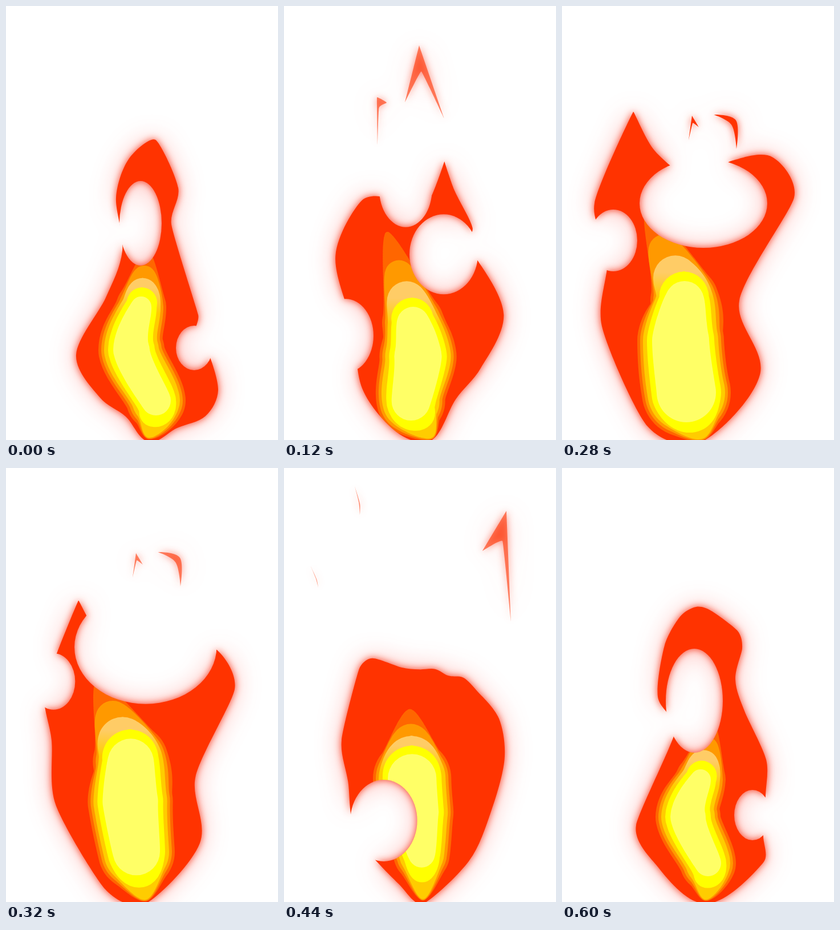
Animation, 477 px wide and 759 px high, one loop 0.64 s. Source, as an HTML page with a canvas:

```html
<!DOCTYPE html>
<html lang="en">
<head>
<meta charset="utf-8">
<title>Flame</title>
<style>
html, body { margin: 0; width: 100%; height: 100%; overflow: hidden; background: #fff; }
canvas { display: block; }
</style>
</head>
<body>
<canvas id="stage" width="477" height="759"></canvas>
<script>
const W = 477, H = 759, STEP = 40, STEPS = 16;
const ctx = document.getElementById('stage').getContext('2d');
const sheet = Object.assign(document.createElement('canvas'), { width: W, height: H });
const ink = sheet.getContext('2d');

// Silhouette key points, clockwise from the lower left to the foot.
// heat: spine of the hot core as x, y, radius from bottom to top; tip: where its glow ends.
const poses = [
  { at: 0, tip: [247,432], heat: [[263,690,26], [220,602,32], [237,526,18]],
    edge: [210,718, 165,685, 123,610, 175,510, 204,428, 193,335, 215,268, 262,234, 302,318,
      290,382, 337,540, 332,575, 355,607, 372,672, 350,717, 300,738, 250,762] },
  { at: 2, tip: [190,415], heat: [[228,693,33], [244,620,43], [222,565,25]],
    edge: [200,747, 154,690, 140,600, 105,460, 150,362, 194,364, 200,402, 262,372, 288,286,
      296,345, 330,420, 330,455, 335,495, 376,605, 345,675, 300,712, 255,762] },
  { at: 5, tip: [165,370], heat: [[212,687,36], [217,600,39], [235,533,35]],
    edge: [190,740, 105,630, 80,480, 61,390, 110,296, 186,293, 200,345, 225,305, 268,243,
      305,278, 332,325, 283,361, 350,347, 404,410, 345,550, 303,640, 265,755] },
  { at: 7, tip: [150,355], heat: [[218,676,52], [208,585,50], [215,515,34]],
    edge: [150,735, 70,560, 80,440, 57,345, 125,185, 160,250, 212,296, 225,280, 240,280,
      250,280, 262,290, 300,270, 370,265, 407,335, 311,515, 347,645, 245,762] },
  { at: 10, tip: [185,415], heat: [[250,661,20], [238,580,46], [226,511,53]],
    edge: [222,740, 122,648, 80,550, 90,470, 131,325, 150,345, 200,380, 220,380, 235,380,
      260,380, 290,370, 330,382, 370,425, 389,490, 375,590, 325,680, 243,762] },
  { at: 13, tip: [292,450], heat: [[224,704,30], [219,645,27], [222,607,22]],
    edge: [165,708, 137,630, 177,545, 123,490, 133,405, 164,308, 220,287, 270,297, 325,295,
      345,330, 364,360, 355,405, 391,465, 382,548, 340,620, 323,702, 245,762] },
  { at: 15, tip: [262,445], heat: [[256,691,23], [221,610,31], [243,545,18]],
    edge: [160,688, 130,625, 199,459, 168,400, 180,310, 207,260, 235,243, 262,250, 308,285,
      316,315, 304,370, 320,425, 358,510, 357,572, 353,642, 353,690, 252,762] }
];

// Swirls of air rising through the flame: step, x, y, radius x, radius y.
const swirls = [
  [[7,90,760,20,20], [10,160,690,54,63], [13,205,470,68,88], [15,232,407,50,91],
    [16,236,380,37,74], [18,225,320,60,86], [21,190,322,19,26]],
  [[10,430,600,30,60], [13,352,635,51,84], [15,334,607,32,44], [16,330,598,32,39],
    [18,292,465,60,66], [21,256,373,60,78], [23,248,345,112,78], [26,238,250,150,142], [29,240,100,150,150]],
  [[2,110,610,50,60], [5,105,510,46,73], [7,90,410,42,54], [10,70,300,30,40]]
];

// Torn-off tongues: step, then tail, crown, tail.
const tongues = [
  [2, 212,212, 237,112, 281,240], [2, 164,285, 163,203, 180,212],
  [7, 222,235, 228,192, 240,212], [7, 266,190, 305,200, 306,250],
  [10, 124,75, 133,105, 133,125], [10, 47,215, 57,237, 60,252], [10, 348,188, 390,118, 398,312]
];
const RISE = 43, FADE = .6;

// Heat bands: colour, padding around the core, reach to the foot, reach to the tip.
const bands = [['#f60', 26, 1, 1], ['#f90', 21, 1, .55], ['#fc0', 16, .95, .25], ['#ff0', 9, .35, .05], ['#ff6', 0, 0, 0]];

const mix = (a, b, t) => a.map((v, i) => v + (b[i] - v) * t);
const pairs = list => list.filter((_, i) => i % 2 === 0).map((x, i) => [x, list[2 * i + 1]]);

// Closed curve whose tangents vanish at sharp tips.
function blob(pts) {
  const n = pts.length, path = new Path2D();
  const tan = pts.map((p, i) => {
    const a = pts[(i + n - 1) % n], b = pts[(i + 1) % n];
    const ux = p[0] - a[0], uy = p[1] - a[1], vx = b[0] - p[0], vy = b[1] - p[1];
    const lu = Math.hypot(ux, uy) || 1, lv = Math.hypot(vx, vy) || 1;
    const bend = .7 + (ux * vx + uy * vy) / (lu * lv);
    const size = Math.min(lu, lv) * Math.max(0, Math.min(1, bend)) / 3;
    const len = Math.hypot(ux + vx, uy + vy) || 1;
    return [(ux + vx) / len * size, (uy + vy) / len * size];
  });
  path.moveTo(...pts[0]);
  pts.forEach(([x, y], i) => {
    const j = (i + 1) % n, [ex, ey] = pts[j];
    path.bezierCurveTo(x + tan[i][0], y + tan[i][1], ex - tan[j][0], ey - tan[j][1], ex, ey);
  });
  return path;
}

function carve(step) {
  ink.globalCompositeOperation = 'destination-out';
  for (const track of swirls) for (const s of [step, step + STEPS]) {
    const i = track.findIndex((k, n) => n + 1 < track.length && k[0] <= s && s <= track[n + 1][0]);
    if (i < 0) continue;
    const a = track[i], b = track[i + 1];
    const [, x, y, rx, ry] = mix(a, b, (s - a[0]) / (b[0] - a[0]));
    ink.beginPath();
    ink.ellipse(x, y, rx, ry, 0, 0, 2 * Math.PI);
    ink.fill();
  }
}

// A tapering tube of discs along the spine.
function tube(nodes) {
  const path = new Path2D(), last = nodes.length - 1, detail = 40;
  for (let i = 0; i <= last * detail; i++) {
    const k = Math.min(last - 1, Math.floor(i / detail)), t = i / detail - k;
    const p0 = nodes[Math.max(0, k - 1)], p1 = nodes[k], p2 = nodes[k + 1], p3 = nodes[Math.min(last, k + 2)];
    const [x, y, r] = p1.map((v, d) => d === 2 ? v + (p2[d] - v) * t :
      v + .5 * t * (p2[d] - p0[d] + t * (2 * p0[d] - 5 * v + 4 * p2[d] - p3[d] + t * (3 * (v - p2[d]) + p3[d] - p0[d]))));
    path.moveTo(x + r, y);
    path.arc(x, y, r, 0, 2 * Math.PI);
  }
  return path;
}

function drawHeat(heat, tip, foot) {
  ink.globalCompositeOperation = 'source-atop';
  for (const [color, pad, down, up] of bands) {
    const nodes = heat.map(([x, y, r]) => [x, y, r + pad]);
    if (down) nodes.unshift(mix(nodes[0], [foot[0], 752, 4], down));
    if (up) nodes.push(mix(nodes[nodes.length - 1], [...tip, 5], up));
    ink.fillStyle = color;
    if (color === '#fc0') {
      const top = heat[2][1] - heat[2][2];
      ink.fillStyle = ink.createLinearGradient(0, top - 15, 0, top + 30);
      const fade = ink.createLinearGradient(0, top - 15, 0, top + 30);
      fade.addColorStop(0, '#fc6');
      fade.addColorStop(1, color);
      ink.fillStyle = fade;
    }
    ink.fill(tube(nodes));
  }
}

function drawTongues(step) {
  ink.globalCompositeOperation = 'source-over';
  ink.fillStyle = '#f30';
  for (const [at, ...line] of tongues) {
    const age = step - at;
    if (age < -1 || age > 3) continue;
    const [a, b, c] = pairs(line).map(([x, y]) => [x, y - age * RISE]);
    ink.globalAlpha = Math.pow(FADE, Math.max(0, age));
    ink.fill(blob([a, b, c, mix(mix(a, c, .5), b, .6)]));
  }
  ink.globalAlpha = 1;
}

function glow(color, blur) {
  ctx.save();
  ctx.shadowColor = color;
  ctx.shadowBlur = blur;
  ctx.shadowOffsetX = 2 * W;
  ctx.drawImage(sheet, -2 * W, 0);
  ctx.restore();
}

function draw(step) {
  const k = poses.findLastIndex(p => p.at <= step);
  const a = poses[k], b = poses[k + 1] || a;
  const t = a === b ? 0 : (step - a.at) / (b.at - a.at);
  const edge = pairs(mix(a.edge, b.edge, t));

  ink.globalCompositeOperation = 'source-over';
  ink.clearRect(0, 0, W, H);
  ink.fillStyle = '#f30';
  ink.fill(blob(edge));
  carve(step);
  drawHeat(a.heat.map((n, i) => mix(n, b.heat[i], t)), mix(a.tip, b.tip, t), edge[edge.length - 1]);
  drawTongues(step);

  ctx.fillStyle = '#fff';
  ctx.fillRect(0, 0, W, H);
  glow('rgba(255,60,50,.35)', 46);
  glow('rgba(245,50,20,.9)', 13);
  ctx.drawImage(sheet, 0, 0);
}

const start = performance.now();
function tick() {
  draw(Math.floor((performance.now() - start) / STEP) % STEPS);
  requestAnimationFrame(tick);
}
tick();
</script>
</body>
</html>
```
